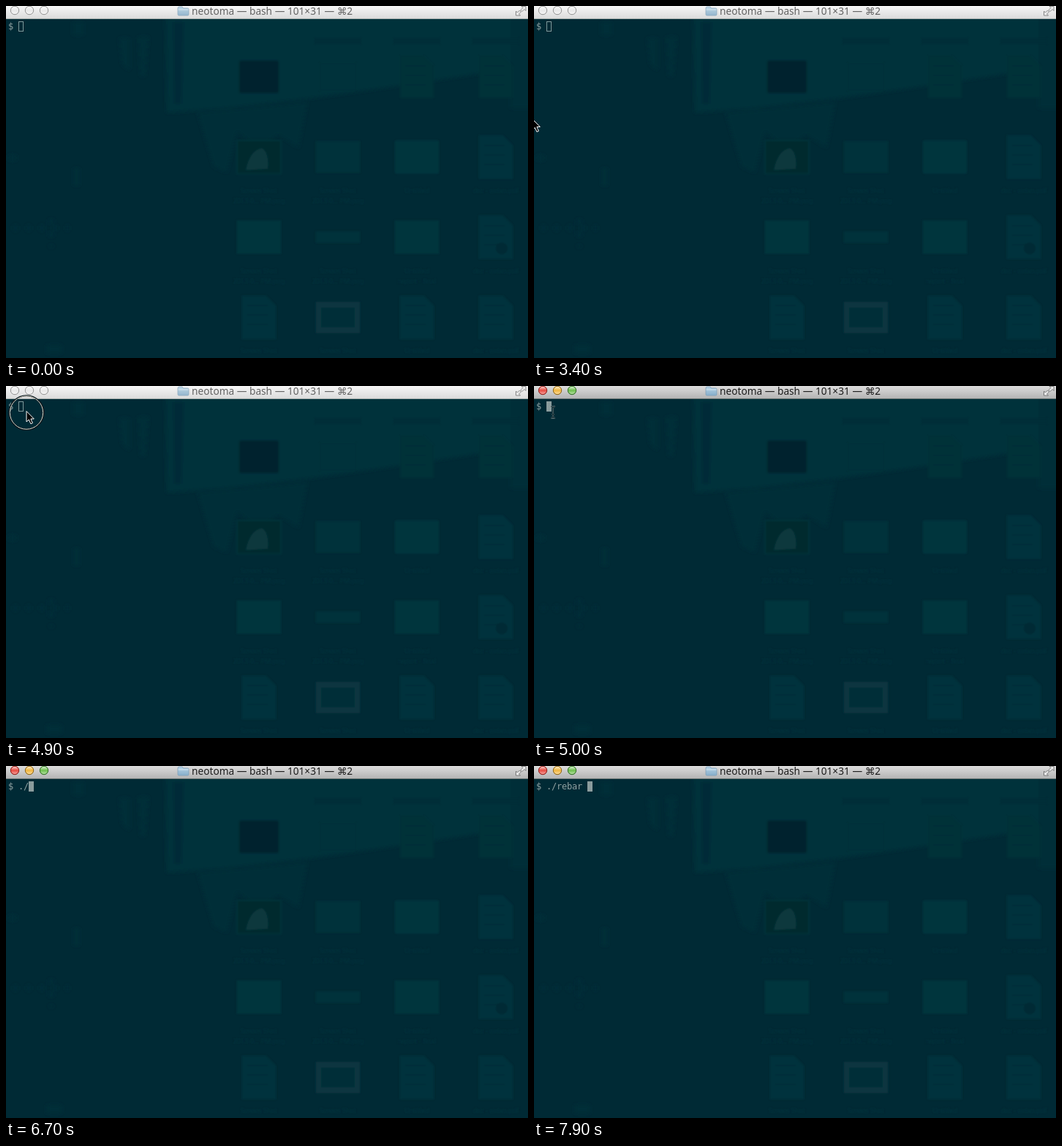
Write an HTML page that moves like this. It is 714x482 px and loops after 8 s.

```html
<!DOCTYPE html>
<html lang="en">
<head>
<meta charset="utf-8">
<title>Terminal</title>
<style>
  html, body { margin: 0; width: 100%; height: 100%; overflow: hidden; background: #002a35; }
  svg { display: block; width: 714px; height: 482px; }
  .title { font: 13.7px "Noto Sans", "DejaVu Sans", sans-serif; }
  .term { font: 12px "DejaVu Sans Mono", monospace; letter-spacing: -.224px; fill: #91a2a2; white-space: pre; }
  .label { font: 9px "Noto Sans", sans-serif; text-anchor: middle; fill: #0b3740; }
</style>
</head>
<body>
<svg viewBox="0 0 714 482">
  <defs>
    <linearGradient id="barOff" x2="0" y2="1">
      <stop stop-color="#f6f6f6"/><stop offset="1" stop-color="#dadada"/>
    </linearGradient>
    <linearGradient id="barOn" x2="0" y2="1">
      <stop stop-color="#dcdcdc"/><stop offset="1" stop-color="#b2b2b2"/>
    </linearGradient>
    <linearGradient id="shine" x2="0" y2="1">
      <stop stop-color="#fff" stop-opacity=".75"/><stop offset=".5" stop-color="#fff" stop-opacity="0"/>
      <stop offset="1" stop-color="#fff" stop-opacity=".5"/>
    </linearGradient>
    <linearGradient id="folder" x2="0" y2="1">
      <stop stop-color="#b9d5e7"/><stop offset="1" stop-color="#86aeca"/>
    </linearGradient>
    <filter id="soft" x="-20%" y="-20%" width="140%" height="140%"><feGaussianBlur stdDeviation="2.5"/></filter>
    <filter id="faint" x="-20%" y="-20%" width="140%" height="140%"><feGaussianBlur stdDeviation=".9"/></filter>
  </defs>

  <rect width="714" height="482" fill="#002a35"/>
  <g filter="url(#soft)">
    <path d="M218 14H690V86L560 106L420 126L300 140L220 146Z" fill="#06323b"/>
    <path d="M229 22h14l-3 112h-10Z" fill="#022c37"/>
    <path d="M690 14h30v126h-30Z" fill="#032e38"/>
    <path d="M262 146l150-14l-12 62l-28-18l-26 20l-30-24l-14 56l-18-8Z" fill="#022d38"/>
    <path d="M155 44h14v44l-10-8ZM181 42h14l-5 54h-6ZM92 22h14v18H92ZM93 222h7v24h-7ZM4 204h10v8H4ZM56 464h20v12H56Z" fill="#042f39"/>
    <path d="M10 304h76M62 292v38" stroke="#042f39" stroke-width="7" stroke-dasharray="6 12" fill="none"/>
  </g>
  <g id="desktop" filter="url(#faint)"></g>

  <rect id="bar" width="714" height="18"/>
  <rect id="edge" y="17" width="714" height="1"/>
  <g id="buttons"></g>
  <g id="chrome">
    <path d="M235 3q0-2 2-2h4l1.5 2h6q1.500 0 1.500 1.500v7q0 1.500-1.500 1.500h-12q-1.500 0-1.500-1.500Z" fill="url(#folder)" stroke="#7fa0b8" stroke-width=".8"/>
    <path d="M235.500 5h14" stroke="#d8e8f2"/>
    <text class="title" x="254" y="11.500">neotoma — bash — 101×31 — ⌘2</text>
    <g fill="#eee" stroke="#777">
      <path d="M711 .5v6l-2-2l-3 3l-2-2l3-3l-2-2ZM697.500 13v-6l2 2l3-3l2 2l-3 3l2 2Z"/>
    </g>
  </g>

  <text class="term" id="line" x="3" y="32" xml:space="preserve"></text>
  <rect id="caret" y="21" width="7" height="14"/>
  <g id="ring" fill="none">
    <circle cx="28" cy="36.500" r="23.300" stroke="#001218" stroke-width="2"/>
    <circle cx="28" cy="36.500" r="22.700" stroke="#e3d9cc"/>
  </g>
  <path id="arrow" d="M0 0V14.500L3.300 11.500L5.900 17.300L8.400 16.200L5.900 10.500H10.300Z" fill="#000" stroke="#fff" stroke-linejoin="round"/>
  <g id="beam" fill="none">
    <path d="M-3-8Q0-8 0-6Q0-8 3-8M0-6V6M-3 8Q0 8 0 6Q0 8 3 8M-1.500 3h3" stroke="#b4c0c0" stroke-width="2" opacity=".65"/>
    <path d="M-3-8Q0-8 0-6Q0-8 3-8M0-6V6M-3 8Q0 8 0 6Q0 8 3 8M-1.500 3h3" stroke="#00151b"/>
  </g>
</svg>
<script>
const LOOP = 8000, TICK = 100, CELL = 7;
const $ = id => document.getElementById(id);
const set = (el, attrs) => { for (const k in attrs) el.setAttribute(k, attrs[k]); };
const add = (parent, tag, attrs, text = '') => {
  const el = document.createElementNS('http://www.w3.org/2000/svg', tag);
  set(el, attrs);
  el.textContent = text;
  parent.append(el);
  return el;
};
const show = (el, on) => set(el, { visibility: on ? 'visible' : 'hidden' });

// Icons seen dimly through the window: kind, width, height
const rows = [
  [['dark', 53, 44], ['ghost', 50, 38], ['doc', 46, 58], ['doc', 46, 58]],
  [['photo', 60, 46], ['ghost', 61, 44], ['folder', 61, 46], ['doc', 47, 60]],
  [['wide', 61, 46], ['ghost', 61, 16], ['wide', 61, 46], ['doc', 47, 60]],
  [['doc', 47, 60], ['frame', 61, 43], ['doc', 47, 60], ['doc', 47, 60]]
];
const tones = { dark: '#00232e', ghost: '#04303a', photo: '#02292f', frame: '#09353f' };
const desk = $('desktop');
rows.forEach((row, r) => row.forEach(([kind, w, h], c) => {
  const x = 346 + c * 108, y = 97 + r * 109.8, left = x - w / 2, top = y - h / 2;
  if (kind === 'doc') {
    add(desk, 'path', { d: `M${left} ${top}h${w - 14}l14 14v${h - 14}h${-w}Z`, fill: r ? '#06333d' : '#053039' });
    for (let i = 1; i < 4; i++)
      add(desk, 'rect', { x: left + 7, y: top + i * 13, width: w - 18, height: 2, fill: '#042d38' });
  } else {
    add(desk, 'rect', { x: left, y: top, width: w, height: h, rx: kind === 'folder' ? 3 : 1, fill: tones[kind] || '#06343e' });
  }
  if (kind === 'frame') add(desk, 'rect', { x: left + 8, y: top + 8, width: w - 16, height: h - 16, fill: '#042e39' });
  if (kind === 'photo') {
    add(desk, 'rect', { x: left, y: top, width: w, height: h, fill: 'none', stroke: '#05323b', 'stroke-width': 2 });
    add(desk, 'path', { d: `M${x - 18} ${y + 18}q6-28 22-30q10 6 8 28Z`, fill: '#0a393d' });
  }
  const shot = c < 2;
  const label = (text, dy) => add(desk, 'text', { class: 'label', x, y: y + dy, opacity: r ? .8 : .45 }, text);
  if (r) label(shot ? 'Screen Shot' : c === 2 ? 'Untitled' : 'doc - notes.pdf', 49);
  if (r && r < 3 && shot) label('2013-0... PM.png', 63);
  if (r === 2 && c === 2) label('report - final', 63);
}));
for (const x of [454, 562, 670]) add(desk, 'rect', { x: x - 32, y: 44, width: 64, height: 8, fill: '#042f39' });
add(desk, 'circle', { cx: 678, cy: 332, r: 8, fill: '#022a34' });

const glyphs = ['M-3-3L3 3M3-3L-3 3', 'M-4 0H4', 'M-4 0H4M0-4V4'];
const lights = [['#e8493f', '#8e211c'], ['#f2b63c', '#8d661a'], ['#6cbf4b', '#35702a']].map(([fill, rim], i) => {
  const g = add($('buttons'), 'g', { transform: `translate(${12 + i * 20} 6)` });
  const disc = add(g, 'circle', { r: 5.7 });
  add(g, 'circle', { r: 5, fill: 'url(#shine)' });
  const mark = add(g, 'path', { d: glyphs[i], stroke: rim, 'stroke-width': 1.8 });
  return { disc, mark, fill, rim };
});

// Motion tables: time, x, y
const arrowPath = [[3400, -2, 155], [3600, 14, 100], [3800, 34, 46], [4000, 48, 17], [4100, 52, 12],
  [4200, 49, 19], [4400, 37, 31], [4700, 28, 34.5], [5000, 28, 34.5]];
const beamPath = [[5000, 26, 36], [5200, 20, 37], [5500, -12, 40]];
const keys = [[6200, '.'], [6500, '/'], [6800, 'r'], [7000, 'e'], [7200, 'b'], [7300, 'a'], [7500, 'r'], [7900, ' ']];

function place(el, path, t) {
  const on = t >= path[0][0] && t < path.at(-1)[0];
  show(el, on);
  if (!on) return;
  const i = path.findIndex(p => p[0] > t);
  const [t0, x0, y0] = path[i - 1], [t1, x1, y1] = path[i];
  const k = (t - t0) / (t1 - t0);
  set(el, { transform: `translate(${x0 + (x1 - x0) * k} ${y0 + (y1 - y0) * k})` });
}

function draw(t) {
  const active = t >= 5000, hover = t >= 4000 && t < 4200;
  set($('bar'), { fill: active ? 'url(#barOn)' : 'url(#barOff)' });
  set($('edge'), { fill: active ? '#66716f' : '#a3aaa8' });
  set($('chrome'), { fill: active ? '#1c1c1c' : '#4c4c4c', opacity: active ? 1 : .85 });
  for (const { disc, mark, fill, rim } of lights) {
    const lit = active || hover;
    set(disc, { fill: lit ? fill : '#e9e9e9', stroke: lit ? rim : '#969696' });
    show(mark, hover);
  }
  const typed = keys.filter(k => t >= k[0]).map(k => k[1]).join('');
  $('line').textContent = '$ ' + typed;
  const x = 17 + typed.length * CELL;
  set($('caret'), active
    ? { x, y: 21, width: 7, height: 14, fill: '#8b9c9d', stroke: 'none' }
    : { x: x + .5, y: 21.5, width: 6, height: 13, fill: 'none', stroke: '#81989a' });
  show($('ring'), t >= 4900 && t < 5000);
  place($('arrow'), arrowPath, t);
  place($('beam'), beamPath, t);
}

function frame() {
  draw(Math.floor(performance.now() % LOOP / TICK) * TICK);
  requestAnimationFrame(frame);
}
frame();
</script>
</body>
</html>
```
